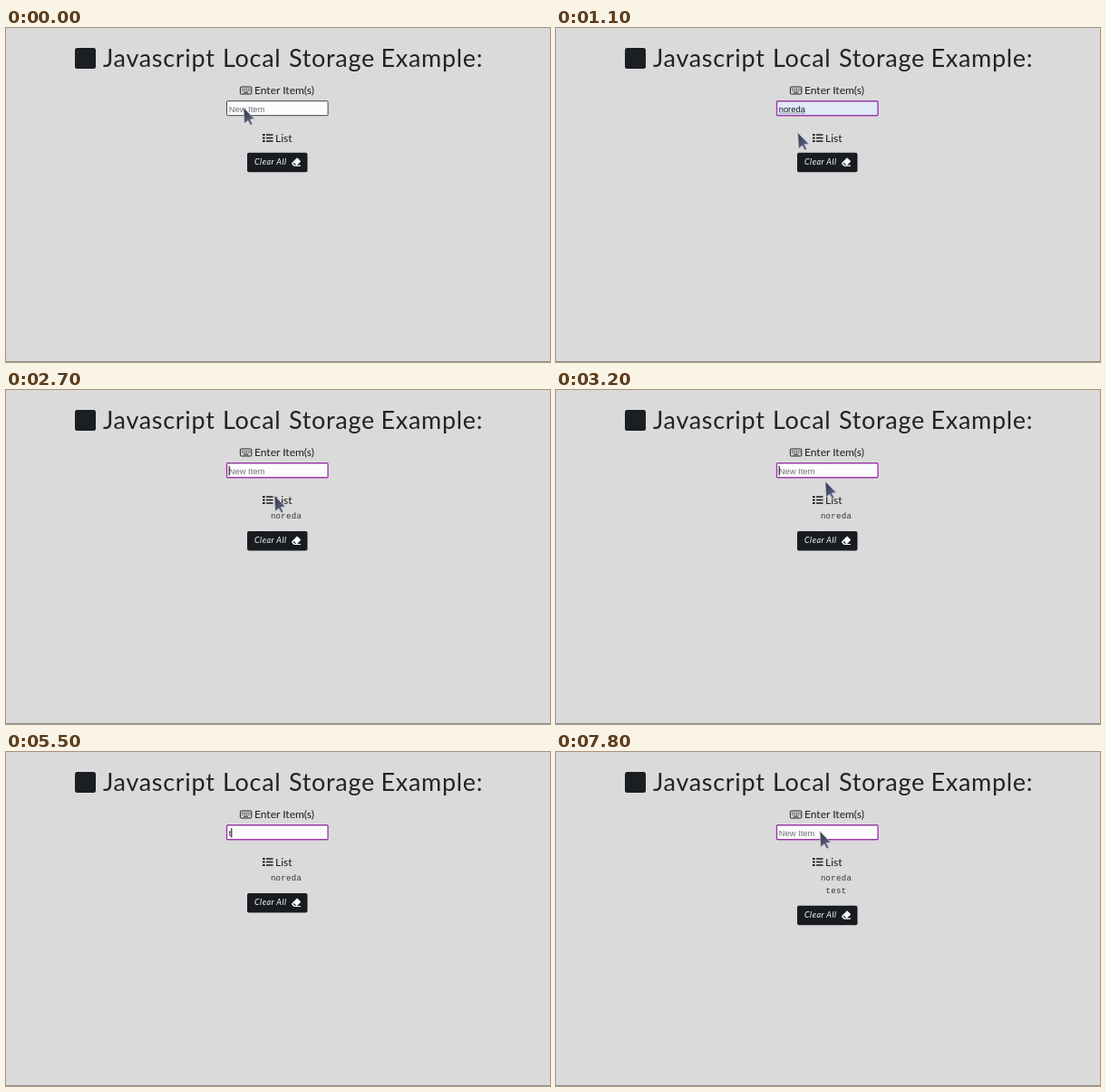
An HTML page for the animation above (8 s loop, 600 px wide and 369 px high).

```html
<!DOCTYPE html>
<html lang="en">
<head>
<meta charset="utf-8">
<title>Local Storage Example</title>
<style>
html, body { margin: 0; width: 100%; height: 100%; overflow: hidden; background: #dbdadb; }
svg { display: block; width: 600px; height: 369px; }
text { white-space: pre; }
.title { font: 27px Lato, sans-serif; letter-spacing: .7px; fill: #202327; }
.label { font: 12px Lato, sans-serif; fill: #191b1e; }
.field { font: 9.4px "Liberation Sans", Arial, sans-serif; }
.menu { font: 600 8.5px Inter, sans-serif; fill: #fff; }
.item { font: 9px "Liberation Mono", monospace; letter-spacing: .3px; fill: #333; text-anchor: middle; }
.script { font: italic 9px Lato, sans-serif; letter-spacing: .5px; fill: #fff; }
</style>
</head>
<body>
<svg viewBox="0 0 600 369">
  <defs>
    <linearGradient id="steel" x2="1" y2="1">
      <stop stop-color="#30364a"/><stop offset="1" stop-color="#6a6d8c"/>
    </linearGradient>
  </defs>
  <rect width="600" height="369" fill="#dbdadb"/>
  <rect y="368" width="600" height="1" fill="#929292"/>

  <rect x="76" y="22" width="23" height="23" rx="2.5" fill="#1b1f23"/>
  <g class="title">
    <text x="107" y="43">Javascript</text>
    <text x="239" y="43">Local</text>
    <text x="312" y="43">Storage</text>
    <text x="413.5" y="43">Example:</text>
  </g>

  <g fill="none" stroke="#202327">
    <rect x="258.4" y="65" width="12.4" height="8" rx="1"/>
    <path d="M260 67.3h9.5M260 69.2h9.5" stroke-width="1" stroke-dasharray="1 .7"/>
    <path d="M262 71.2h5.2"/>
  </g>
  <text class="label" x="274" y="73">Enter Item(s)</text>

  <path d="M283 118h2.6M283 121.5h2.6M283 125h2.6" stroke="#191b1e" stroke-width="2.2"/>
  <path d="M287 118h7.5M287 121.5h7.5M287 125h7.5" stroke="#191b1e" stroke-width="1.4"/>
  <text class="label" x="297" y="125.5">List</text>
  <text class="item" id="first" x="309" y="142"></text>
  <text class="item" id="second" x="309" y="156"></text>

  <g id="button">
    <rect x="266" width="66.5" height="21.5" rx="2" fill="#181b1f"/>
    <text class="script" x="274" y="13">Clear All</text>
    <path d="M315.3 11.3l5.2-5.2q.6-.5 1.2 0l3 3q.5.6 0 1.2l-3.7 3.6h4v1.2h-7.3l-2.4-2.4q-.5-.7 0-1.4z" fill="#fff"/>
    <path d="M317.5 11l2.8 2.8h-1.7l-1.9-1.9z" fill="#181b1f"/>
  </g>

  <rect id="halo" x="242.5" y="79.8" width="113.8" height="18" rx="2" fill="#eee6ef"/>
  <rect id="box" x="243.5" y="80.7" width="111.6" height="16" rx="1"/>
  <text class="field" id="value" x="245.7" y="92.6"></text>
  <path id="spell" stroke="#555" stroke-width=".8" stroke-dasharray="1.4 .8"/>
  <rect id="caret" y="84" width="1" height="10.5" fill="#111"/>

  <g id="menu">
    <rect x="242.5" y="98.5" width="125.2" height="82" rx="2" fill="#888" opacity=".45"/>
    <rect x="243" y="98" width="124.3" height="81" rx="1.5" fill="#222325"/>
    <rect id="hover" x="243" y="103.5" width="124.3" height="23.5" fill="#39393c"/>
    <g class="menu">
      <text id="choice" x="249.7" y="118.5"></text>
      <text x="249.7" y="142">ffff</text>
      <text x="249.7" y="165.3">hhhh</text>
    </g>
  </g>

  <path id="cursor" d="M0 0L12 12.3 7.2 13.1 10 18.2 7.6 19.3 4.9 14.2 1 17.5Z" stroke-linejoin="round"/>
</svg>
<script>
const $ = id => document.getElementById(id);
const LOOP = 8000, NAME = "noreda";
$("choice").textContent = NAME;

// time, x, y of the pointer tip
const path = [
  [0, 262, 88], [100, 262, 88], [300, 262, 97], [500, 261, 108], [900, 262, 112],
  [1000, 262, 112], [1300, 276, 123], [1800, 296, 134], [2200, 296, 133],
  [2500, 296, 118], [2900, 296, 115], [3200, 297, 101], [3600, 292, 88],
  [7600, 292, 88], [7700, 291, 87.5], [LOOP, 291, 87.5]
];
// time, content of the field
const typing = [[0, ""], [400, NAME], [2700, ""], [5500, "t"], [5800, "te"], [6000, "tes"], [6200, "test"], [6800, ""]];
const caretOn = [[100, 1000], [2700, 3000], [3100, 3500], [3900, 4400], [4900, 5300], [5500, 6500], [6800, 7000], [7300, 7700]];

const within = (t, from, to) => t >= from && t < to;
const show = (id, on) => { $(id).style.display = on ? "" : "none"; };
const set = (id, attrs) => { for (const k in attrs) $(id).setAttribute(k, attrs[k]); };

function pointer(t) {
  const i = path.findIndex(p => p[0] > t);
  const [t0, x0, y0] = path[i - 1], [t1, x1, y1] = path[i];
  const k = (t - t0) / (t1 - t0);
  return [x0 + (x1 - x0) * k, y0 + (y1 - y0) * k];
}

function draw(t) {
  const focused = t >= 100;
  const preview = within(t, 400, 1000), filled = within(t, 400, 2700);
  const open = within(t, 200, 1000) || within(t, 3900, 5500);
  const text = typing.filter(s => s[0] <= t).pop()[1];
  const [x, y] = pointer(t);

  show("halo", focused);
  set("box", {
    fill: filled ? "#dfe9f8" : "#fcfbfd",
    stroke: focused ? "#963ca2" : "#42444a",
    "stroke-width": focused ? 1.4 : 1
  });
  const value = $("value");
  value.textContent = text || "New Item";
  value.style.fontSize = preview ? "8.2px" : "";
  value.style.fill = text ? "#17191c" : "#707075";

  const end = 245.7 + (text ? value.getComputedTextLength() : 0);
  show("spell", filled && !preview);
  set("spell", { d: `M246 94.2H${end}` });
  show("caret", caretOn.some(([a, b]) => within(t, a, b)));
  set("caret", { x: preview ? 245.7 : end });

  $("first").textContent = t >= 2700 ? NAME : "";
  $("second").textContent = t >= 6800 ? "test" : "";
  set("button", { transform: `translate(0 ${t < 2700 ? 137.7 : t < 6800 ? 156 : 169.7})` });

  show("menu", open);
  show("hover", preview);
  const small = open && y > 98;
  show("cursor", !within(t, 5500, 6500));
  set("cursor", {
    transform: `translate(${x} ${y}) scale(${small ? .62 : 1})`,
    fill: small ? "#222325" : "url(#steel)",
    stroke: small ? "#fff" : "#c3c4d2",
    "stroke-width": small ? 1.4 : .7
  });
}

const start = performance.now();
function tick() {
  const t = (performance.now() - start) % LOOP;
  draw(Math.floor(t / 100) * 100);
  requestAnimationFrame(tick);
}
tick();
</script>
</body>
</html>
```
